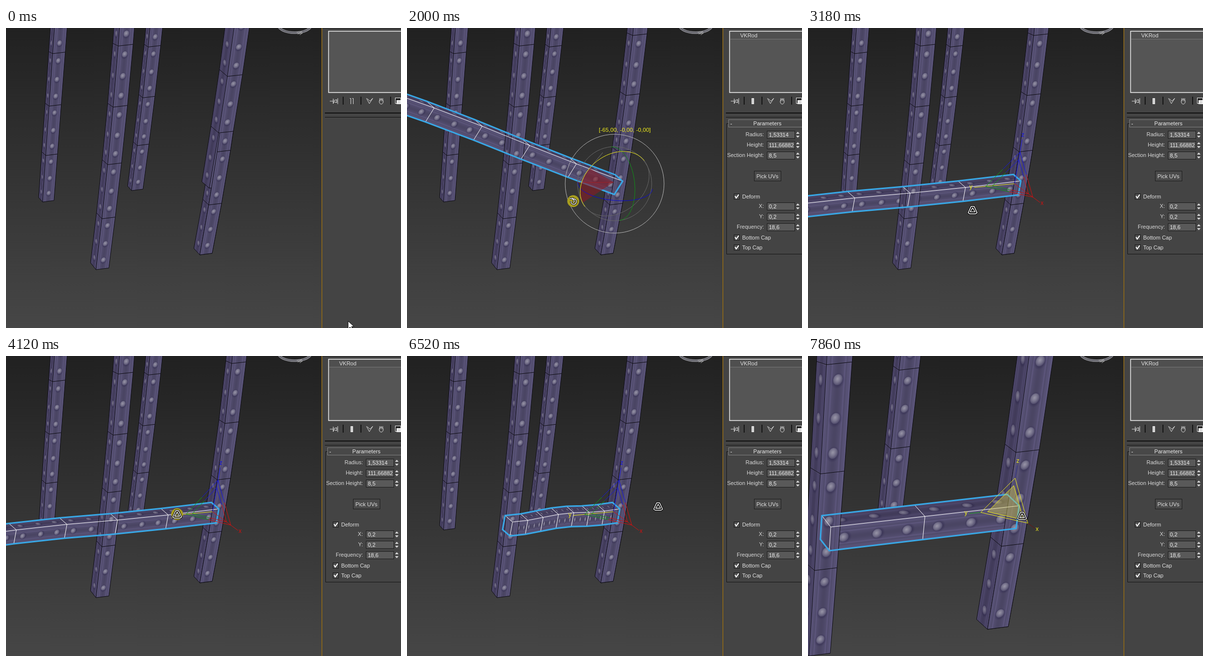
Animation, 799 px wide and 607 px high, one loop 8 s. Source, as an HTML page with a canvas:

```html
<!DOCTYPE html>
<html lang="en">
<head>
<meta charset="utf-8">
<title>Girder rotate and scale</title>
<style>
html, body { margin: 0; height: 100%; overflow: hidden; background: #444; }
canvas { display: block; }
</style>
</head>
<body>
<canvas id="stage" width="799" height="607"></canvas>
<script>
const ctx = document.getElementById('stage').getContext('2d');
const LOOP = 8000, RAD = Math.PI / 180;
const FONT = '"Liberation Sans", Arial, sans-serif';
const BLUE = '#38a8e6', YELLOW = '#f0ec1c', INK = '#0c0b12';
const mix = (a, b, f) => a + (b - a) * f;
const add = (p, q, k = 1) => [p[0] + q[0] * k, p[1] + q[1] * k];
// Progress from 0 to 1 between two times; power above 1 eases out.
const ramp = (t, from, to, power = 1) =>
  1 - (1 - Math.min(1, Math.max(0, (t - from) / (to - from)))) ** power;

function path(pts, close) {
  ctx.beginPath();
  pts.forEach(p => ctx.lineTo(p[0], p[1]));
  if (close) ctx.closePath();
}
function line(pts, color, width = 1, close = false) {
  path(pts, close);
  ctx.strokeStyle = color;
  ctx.lineWidth = width;
  ctx.stroke();
}
function fill(pts, color) {
  path(pts, true);
  ctx.fillStyle = color;
  ctx.fill();
}
function arc(x, y, rx, ry, rot, from, to, color, back = false, width = 1) {
  ctx.beginPath();
  ctx.ellipse(x, y, rx, ry, rot, from, to, back);
  ctx.strokeStyle = color;
  ctx.lineWidth = width;
  ctx.stroke();
}
function box(x, y, w, h, color, border) {
  ctx.fillStyle = color;
  ctx.fillRect(x, y, w, h);
  if (border) {
    ctx.strokeStyle = border;
    ctx.lineWidth = 1;
    ctx.strokeRect(x + .5, y + .5, w - 1, h - 1);
  }
}
function text(str, x, y, color = '#e2e2e2', align = 'left', size = 11) {
  ctx.font = size + 'px ' + FONT;
  ctx.textAlign = align;
  ctx.fillStyle = color;
  ctx.fillText(str, x, y);
}

// ---- riveted metal ----
function makeTile(shade) {
  const W = 64, H = 240;
  const c = document.createElement('canvas'), g = c.getContext('2d');
  c.width = W;
  c.height = H;
  const bump = (e, at, size) => Math.exp(-(((e - at) / size) ** 2));
  for (let x = 0; x < W; x++) {
    const e = Math.abs(x - 31.5) / 31.5;
    const light = 39 - 6 * bump(e, 0, .45) + 4 * bump(e, .52, .06) - 3 * bump(e, .64, .06) + 4 * bump(e, 1, .08);
    g.fillStyle = `hsl(250 18% ${light}%)`;
    g.fillRect(x, 0, 1, H);
  }
  const spot = (x, y, r, inner, mid, outer) => {
    const grad = g.createRadialGradient(x, y, 0, x, y, r);
    [inner, mid, outer].forEach((s, i) => grad.addColorStop(i / 2, s));
    g.fillStyle = grad;
    g.fillRect(0, y - r, W, 2 * r);
  };
  for (const y of [.15, .505, .825].map(f => f * H)) {
    spot(32, y + 2, 18, 'rgba(40,34,72,.8)', 'rgba(40,34,72,.5)', 'rgba(40,34,72,0)');
    g.save();
    g.beginPath();
    g.arc(32, y, 12, 0, 7);
    g.clip();
    spot(31, y - 2, 15, '#9996a8', '#77738c', '#4c4768');
    g.restore();
  }
  g.fillStyle = `rgba(32,26,56,${shade})`;
  g.fillRect(0, 0, W, H);
  return c;
}
const bright = makeTile(0), dim = makeTile(.22);

function face(a, b, c, d, tile) {
  const u = [(b[0] - a[0] + d[0] - c[0]) / 128, (b[1] - a[1] + d[1] - c[1]) / 128];
  const v = [(c[0] - a[0] + d[0] - b[0]) / 480, (c[1] - a[1] + d[1] - b[1]) / 480];
  fill([a, b, d, c], '#554e6e');
  ctx.save();
  ctx.clip();
  ctx.transform(...u, ...v, ...a);
  ctx.drawImage(tile, 0, 0);
  ctx.restore();
}

// A beam is a list of stations [side, middle, other], far end first.
// It rises from a foot point; its sections grow towards the viewer.
function beam({x, y, lean, bow = 0, section, growth, width, side, rise}) {
  const st = [];
  for (let d = 0, last = 0; last < y + 30; d += section, section *= growth) {
    const m = [x + lean * d - bow * d * d, y - d];
    st.unshift([add(m, [side[0], side[1] + rise * d]), m,
                add(m, [width * (1 + d * .00035), -.13 * width])]);
    last = d;
  }
  return st;
}
function faces(st, from = 0) {
  for (let i = 1; i < st.length; i++)
    for (let j = from; j < 2; j++)
      face(st[i - 1][j], st[i - 1][j + 1], st[i][j], st[i][j + 1], j ? bright : dim);
}
function wires(st, color, from = 0) {
  for (let j = from; j < 3; j++) line(st.map(s => s[j]), color);
  st.forEach(s => line(s.slice(from), color));
}
function solid(st, from) {
  faces(st, from);
  wires(st, INK, from);
}
const capCorner = s => add(add(s[0], s[2]), s[1], -1);
function outline(st) {
  const end = st[st.length - 1];
  wires(st, '#fff');
  line([...st.map(s => s[0]), end[1], ...st.map(s => s[2]).reverse(), capCorner(st[0])],
    BLUE, 3, true);
}

const far = {growth: 1.063}, near = {growth: 1.13};
const wide = {
  back: [
    beam({...far, x: 74, y: 352, lean: .068, section: 94, width: 23, side: [-8, -9], rise: .016}),
    beam({...far, x: 254, y: 329, lean: .13, bow: 5e-5, section: 91, width: 23, side: [-8, -9], rise: .012})],
  left: beam({...far, x: 182, y: 489, lean: .122, bow: 5e-5, section: 103, width: 26, side: [-11, -14], rise: .019}),
  right: beam({...far, x: 392, y: 459, lean: .19, bow: 1e-4, section: 101, width: 25, side: [-12, -13], rise: .017})
};
const zoom = {
  back: [beam({...near, x: 153, y: 329, lean: .104, section: 141, width: 37, side: [-12, -13], rise: .015})],
  left: beam({...near, x: 2, y: 607, lean: .066, bow: 1e-5, section: 173, width: 43, side: [-20, -22], rise: .026}),
  right: beam({...near, x: 363, y: 553, lean: .175, bow: 4e-5, section: 168, width: 42, side: [-22, -20], rise: .009})
};
const zoomBar = [2, 1, 0].map(i => {
  const m = [427 - 190.5 * i, 303 + 21.5 * i];
  return [add(m, [3 * i - 24, -23]), m, add(m, [1.5 * i - 6, 46 + i])];
});

// The movable bar: turned by an angle, then shortened along its axis.
function makeBar(angle, length, n) {
  const c = Math.cos(angle), s = Math.sin(angle), upright = angle < .87;
  const st = [];
  for (let i = n; i >= 0; i--) {
    const flat = length * i / n, z = flat * (1 + .0001 * flat * c), k = 1 + .0003 * z * c;
    const wave = n > 2 ? -Math.min(3, i) * Math.sin(Math.PI * (i - 2) / 3) * s : 0;
    const at = y => {
      const a = y * c - z * s, b = y * s + z * c;
      return [425.5 + 2.5 * s + a + .18 * b - 7e-5 * (z * c) ** 2,
              322.5 + s - .11 * a - .988 * b + wave];
    };
    const low = at(-14.3 * k), high = at(14.3 * k), m = upright ? low : high;
    st.push([add(m, [-15 * k, -13 * k]), m, upright ? high : low]);
  }
  return st;
}

// ---- manipulators ----
function rotateGizmo(deg, active) {
  const tilt = -.658;
  if (active) {
    ctx.beginPath();
    ctx.moveTo(418, 312);
    ctx.ellipse(420, 315, 76, 58, tilt, -106 * RAD, -(106 + deg) * RAD, true);
    ctx.fillStyle = 'rgba(135,28,38,.6)';
    ctx.fill();
    line([[345, 313], [396, 252]], '#777');
    line([[418, 312], [345, 313]], '#a02028');
    arc(420, 315, 76, 58, tilt, 0, Math.PI, '#666');
  }
  arc(420, 315, 100, 100, 0, 0, 7, '#b4b4b4');
  arc(420, 315, 75, 75, 0, 0, 7, '#686868');
  arc(421, 319, 76, 30, .09, 0, Math.PI, '#0808d8');
  arc(421.5, 315, 75, 39, 1.456, 0, Math.PI, '#109018', true);
  arc(420, 315, 76, 58, tilt, 0, Math.PI, YELLOW, true);
  if (active) text(`[-${deg},00, -0,00, -0,00]`, 388, 210, YELLOW, 'left', 11.6);
  else line([[405, 302], [408, 295], [412, 301]], '#b02020');
}
function scaleGizmo(o, stretch, all) {
  const axes = [[54, 40], [-86 * stretch, 8 * stretch], [16, -94]];
  const colors = all ? [YELLOW, YELLOW, YELLOW] : ['#d01010', '#10a010', '#1414e0'];
  const shafts = all ? ['#701010', '#10a010', '#303090'] : [colors[0], YELLOW, colors[2]];
  const at = (i, k) => add(o, axes[i], k);
  if (all) fill([0, 1, 2].map(i => at(i, .52)), 'rgba(205,195,80,.45)');
  shafts.forEach((color, i) => line([at(i, all ? .68 : 0), at(i, .95)], color));
  for (const k of [.68, .52])
    for (let i = 0; i < 3; i++) {
      const j = (i + 1) % 3, a = at(i, k), b = at(j, k), m = add(a, add(b, a, -1), .5);
      line([a, m], colors[i]);
      line([m, b], colors[j]);
    }
  ['x', 'y', 'z'].forEach((name, i) => {
    const p = at(i, 1.03);
    text(name, p[0], p[1] + 2, all || i === 1 ? YELLOW : colors[i], 'center', 12);
  });
}

// ---- cursors ----
function cursor(kind, [x, y], held) {
  ctx.save();
  ctx.translate(x, y);
  ctx.lineJoin = 'round';
  if (held) {
    ctx.beginPath();
    ctx.arc(0, 0, 12, 0, 7);
    ctx.fillStyle = '#a89e20';
    ctx.fill();
  }
  if (kind === 'arrow') {
    const shape = [[0, 0], [0, 16], [4, 12], [7, 18], [9, 17], [7, 11], [12, 11]];
    fill(shape, '#fff');
    line(shape, '#000', 1, true);
  } else for (const [color, w] of [['#000', 3.6], ['#fff', 1.5]]) {
    if (kind === 'rotate') {
      arc(1, 1, 5.5, 5.5, 0, -2.3, 3.3, color, false, w);
      line([[-7, -5], [-1, -6], [2, -1], [1, 3]], color, w);
    } else {
      line([[-3, -7], [3, -7], [9, 6], [6, 8], [-6, 8], [-9, 6]], color, w, true);
      line([[0, -4], [5, 4], [-5, 4]], color, w * .9, true);
    }
  }
  ctx.restore();
}

// ---- command panel ----
function spinner(label, value, y) {
  text(label, 722, y + 3, '#d8d8d8', 'right');
  box(728, y - 8, 57, 16, '#595959', '#1c1c1c');
  text(value, 732, y + 4, '#f0f0f0');
  box(786, y - 8, 10, 16, '#484848');
  for (const k of [-1, 1]) fill([[787, y + 2 * k], [790.5, y + 6 * k], [794, y + 2 * k]], '#ddd');
}
function check(label, y) {
  box(661, y - 6, 12, 12, '#505050', '#1c1c1c');
  line([[663.5, y - 1], [666, y + 3], [671, y - 4]], '#fff', 2);
  text(label, 678, y + 4);
}
function toolbar(loaded) {
  for (const x of [681, 717, 777]) box(x, 139, 2, 16, '#151515');
  line([[655, 148], [662, 148]], '#ddd');
  line([[662, 143], [662, 153], [663, 149], [669, 151], [669, 145], [663, 147]], '#eee');
  line([[671, 142], [671, 154]], '#ddd');
  if (loaded) box(697, 142, 5, 12, '#ccc', '#eee');
  else for (const x of [697.5, 702.5]) line([[x - 2, 142.5], [x, 142.5], [x, 154]], '#ddd');
  line([[729, 142], [735, 153], [742, 142], [736, 148], [731, 143]], '#ddd');
  arc(759, 149, 4, 5, 0, 0, 7, '#ddd');
  for (const x of [756, 759, 762]) line([[x, 148], [x, 142]], '#ddd');
  box(787, 141, 12, 12, '#222', '#eee');
  box(790, 146, 9, 8, '#ddd', '#fff');
}
function panel(loaded) {
  box(638, 0, 161, 607, '#444');
  box(638, 0, 2, 607, '#80611f');
  box(640, 0, 159, 2, '#333');
  box(652, 6, 160, 126, '#555');
  line([[799, 6.5], [652.5, 6.5], [652.5, 130.5], [799, 130.5]], '#f0f0f0', 1.5);
  toolbar(loaded);
  box(645, 171, 154, 2, '#111');
  box(645, 180, 154, 1, '#111');
  if (!loaded) return;
  box(654, 8, 145, 14, '#4f4f4f');
  box(654, 22, 145, 1, '#777');
  text('VKRod', 674, 19);
  line([[650, 193.5], [646.5, 193.5], [646.5, 457.5], [799, 457.5]], '#151515');
  box(650, 185, 155, 16, '#484848', '#808080');
  text('-', 654, 197, '#fff');
  text('Parameters', 729, 197, '#f0f0f0', 'center');
  ['Radius:1,53314', 'Height:111,66882', 'Section Height:8,5'].forEach((row, i) =>
    spinner(...row.split(/(?<=:)/), 216 + 21 * i));
  box(702, 289, 55, 21, '#4a4a4a', '#1c1c1c');
  text('Pick UVs', 729, 304, '#e2e2e2', 'center');
  check('Deform', 341);
  ['X:0,2', 'Y:0,2', 'Frequency:18,6'].forEach((row, i) =>
    spinner(...row.split(/(?<=:)/), 361 + 21 * i));
  check('Bottom Cap', 424);
  check('Top Cap', 444);
}

function backdrop() {
  const g = ctx.createLinearGradient(0, 0, 0, 607);
  g.addColorStop(0, '#212121');
  g.addColorStop(1, '#464646');
  ctx.fillStyle = g;
  ctx.fillRect(0, 0, 638, 607);
  arc(584, -6, 33, 15.5, 0, 0, Math.PI, '#8c8c92', false, 5);
  arc(584, -6, 33, 15.5, 0, 0, Math.PI, '#5a5a62', false, 2);
  line([[588, 9], [599, 7], [590, 12], [600, 10], [594, 14]], '#aaa');
}

// Pointer moves: start, end, target x, target y, easing power
const moves = [
  [70, 520, 430, 290, 1], [990, 1390, 348, 285, 1], [1400, 2300, 333, 368, 1.4],
  [3180, 3720, 346, 320, 1], [4120, 5440, 508, 304, 1.6], [7170, 7710, 433, 323, 1]];
const pointer = t => moves.reduce(([x, y], [from, to, x2, y2, power]) => {
  const f = ramp(t, from, to, power);
  return [mix(x, x2, f), mix(y, y2, f)];
}, [692, 593]);

function draw(t) {
  const zoomed = t >= 7860, view = zoomed ? zoom : wide;
  const selected = t >= 690, loaded = t >= 990, scaling = t >= 3180;
  const turning = t > 1430 && t < 3010, shrinking = t >= 3970 && t < 6520;
  const deg = 5 * Math.round(9 * ramp(t, 1390, 1620) + 9 * ramp(t, 1780, 2290));
  const stretch = 1 - .723 * ramp(t, 4065, 5740, 3.7);
  const bar = zoomed ? zoomBar
    : t >= 7070 ? makeBar(deg * RAD, 217, 2) : makeBar(deg * RAD, 784 * stretch, 7);

  backdrop();
  ctx.save();
  ctx.beginPath();
  ctx.rect(0, 0, 638, 607);
  ctx.clip();
  view.back.forEach(b => solid(b));
  solid(view.right);
  faces(bar);
  if (deg > 50) {
    const [a, b, c] = bar[0], d = capCorner(bar[0]);
    face(a, b, d, c, dim);
    fill([a, b, c, d], 'rgba(15,14,25,.55)');
  }
  if (!selected) wires(bar, INK);
  solid(view.left);
  // The post's front face hides the end of the bar.
  if (!selected || deg > 50) {
    ctx.save();
    ctx.beginPath();
    ctx.rect(0, 213, 638, 394);
    ctx.clip();
    solid(view.right, 1);
    ctx.restore();
  }
  if (selected) outline(bar);
  if (scaling) scaleGizmo(zoomed ? [408, 311] : [418, 315], t < 6520 ? stretch : 1, t >= 7390);
  else if (loaded) rotateGizmo(deg, turning);
  ctx.restore();

  panel(loaded);
  cursor(scaling ? 'scale' : loaded ? 'rotate' : 'arrow', pointer(t), turning || shrinking);
}

function tick() {
  draw(performance.now() % LOOP);
  requestAnimationFrame(tick);
}
tick();
</script>
</body>
</html>
```
